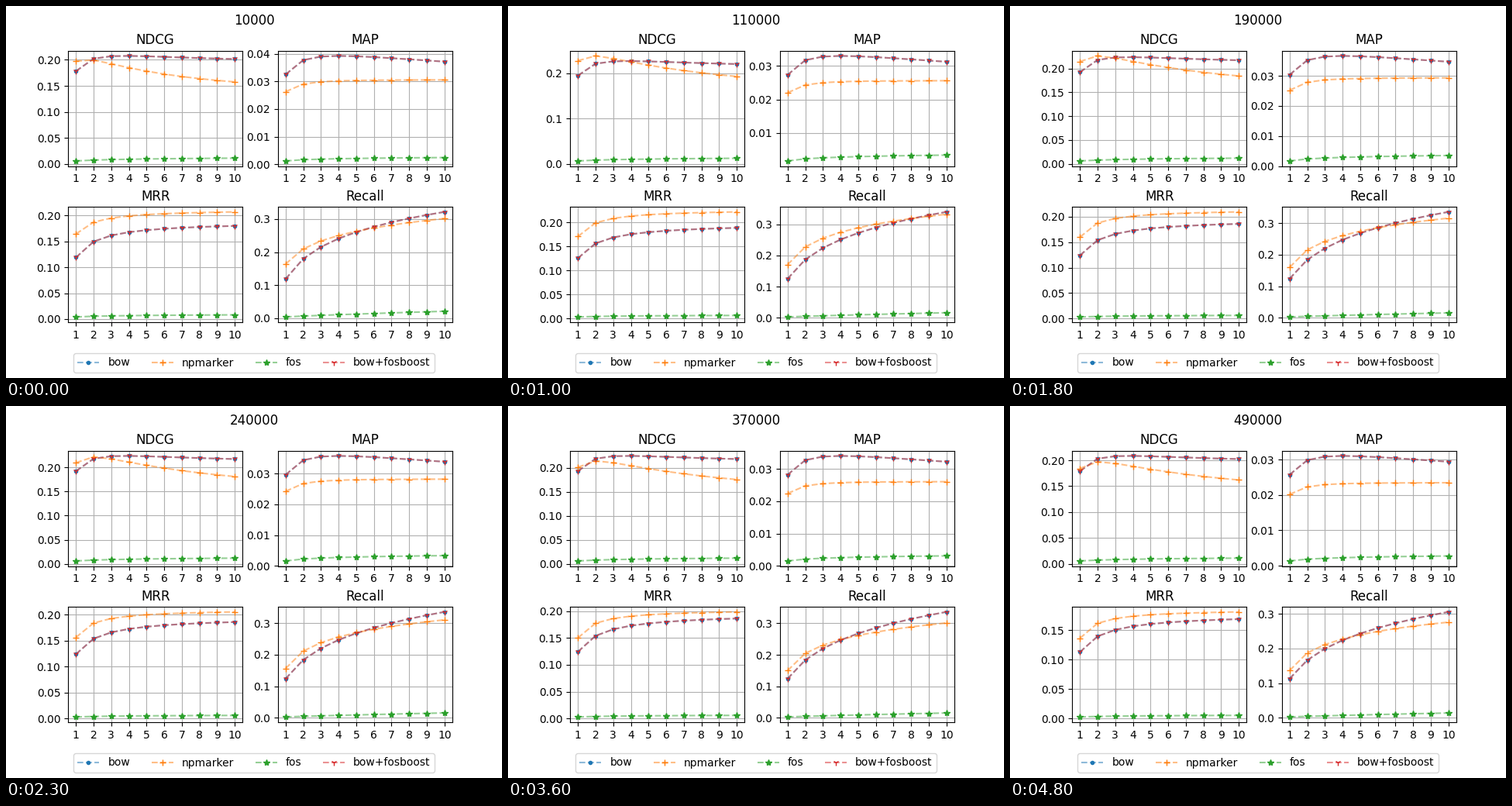
These frames come from a looping animation (640x480 px, 6.3 s). A matplotlib script:

```python
import matplotlib.pyplot as plt
import numpy as np
from matplotlib.animation import FuncAnimation
from matplotlib.colors import to_rgba

STEPS, HOLD = 49, 14
RANKS = np.arange(1, 11)
X = np.log10(RANKS)
METRICS = ["NDCG", "MAP", "MRR", "Recall"]
STYLES = {"bow": ".", "npmarker": "+", "fos": "*", "bow+fosboost": "1"}

# Height of each curve, in 1e-4, at a few steps of the run.
KEY_STEPS = [1, 6, 11, 19, 37, 49]
LEVELS = {
    ("bow", "NDCG"): [2076, 2204, 2265, 2236, 2245, 2085],
    ("bow", "MAP"): [393, 342, 330, 366, 341, 311],
    ("bow", "Recall"): [3216, 3433, 3395, 3353, 3361, 3053],
    ("npmarker", "NDCG"): [1995, 2376, 2378, 2262, 2140, 1971],
    ("npmarker", "MAP"): [306, 285, 256, 293, 261, 235],
    ("npmarker", "Recall"): [3015, 3325, 3320, 3155, 3010, 2757],
    ("fos", "MAP"): [11.7, 16.0, 16.6, 17.2, 15.0, 13.4],
}


def poly(*coefficients):
    return np.polynomial.polynomial.polyval(X, coefficients)


def npmarker_recall(early):
    first = 0.495 + 0.05 * early
    return first + (1 - first) * X ** (0.84 + 0.08 * early)


# Shape over the ranks; `early` falls from 1 to 0 during the run.
SHAPES = {
    ("bow", "NDCG"): lambda early: poly(0.859, 0.578, -0.729, 0.263),
    ("bow", "MAP"): lambda early: poly(0.829, 0.618, -0.638, 0.138),
    ("bow", "Recall"): lambda early: poly(0.37, 0.63) - 0.07 * (1 - early) * X * (1 - X),
    ("npmarker", "NDCG"): lambda early: (poly(0.935, 0.457, -0.899, 0.329)
                                         + early * poly(0.055, -0.22, 0.133)),
    ("npmarker", "MAP"): lambda early: poly(0.86, 0.4125, -0.422, 0.1495),
    ("npmarker", "Recall"): npmarker_recall,
    ("fos", "NDCG"): lambda early: 0.053 * poly(0.51, 0.49),
    ("fos", "MAP"): lambda early: 1 + 1.05 * X ** 0.85,
    ("fos", "Recall"): lambda early: ((0.046 + 0.02 * early ** 2)
                                      * (0.19 + 0.81 * ((RANKS - 1) / 9) ** 0.85)),
}


def scores(name, metric, step):
    if metric == "MRR":
        recall = scores(name, "Recall", step)
        return np.cumsum(np.diff(recall, prepend=0) / RANKS)
    curve = name.removesuffix("+fosboost"), metric
    levels = LEVELS.get(curve, LEVELS["bow", metric])
    level = np.interp(np.log(step), np.log(KEY_STEPS), levels)
    early = 1 - np.log(step) / np.log(STEPS)
    return level * 1e-4 * SHAPES[curve](early)


fig, axes = plt.subplots(2, 2, figsize=(6.4, 4.8), dpi=100,
                         gridspec_kw=dict(left=0.125, right=0.9, bottom=0.15,
                                          top=0.88, wspace=0.2, hspace=0.35))
title = fig.suptitle("10000")
lines = {}
for ax, metric in zip(axes.flat, METRICS):
    ax.set_title(metric)
    ax.set_xticks(RANKS)
    ax.grid(True)
    for i, (name, marker) in enumerate(STYLES.items()):
        color = f"C{i}"
        lines[metric, name], = ax.plot(
            RANKS, scores(name, metric, 1), "--", marker=marker, label=name,
            color=to_rgba(color, 0.5), mec=color, mfc=color)
fig.legend(*axes[0, 0].get_legend_handles_labels(), loc="lower center", ncol=4)


def update(frame):
    step = min(frame + 1, STEPS)
    title.set_text(str(step * 10000))
    for (metric, name), line in lines.items():
        line.set_ydata(scores(name, metric, step))
    for ax in axes.flat:
        ax.relim()
        ax.autoscale_view()


anim = FuncAnimation(fig, update, frames=STEPS + HOLD, interval=100,
                     repeat=True, repeat_delay=0)
plt.show()
```
